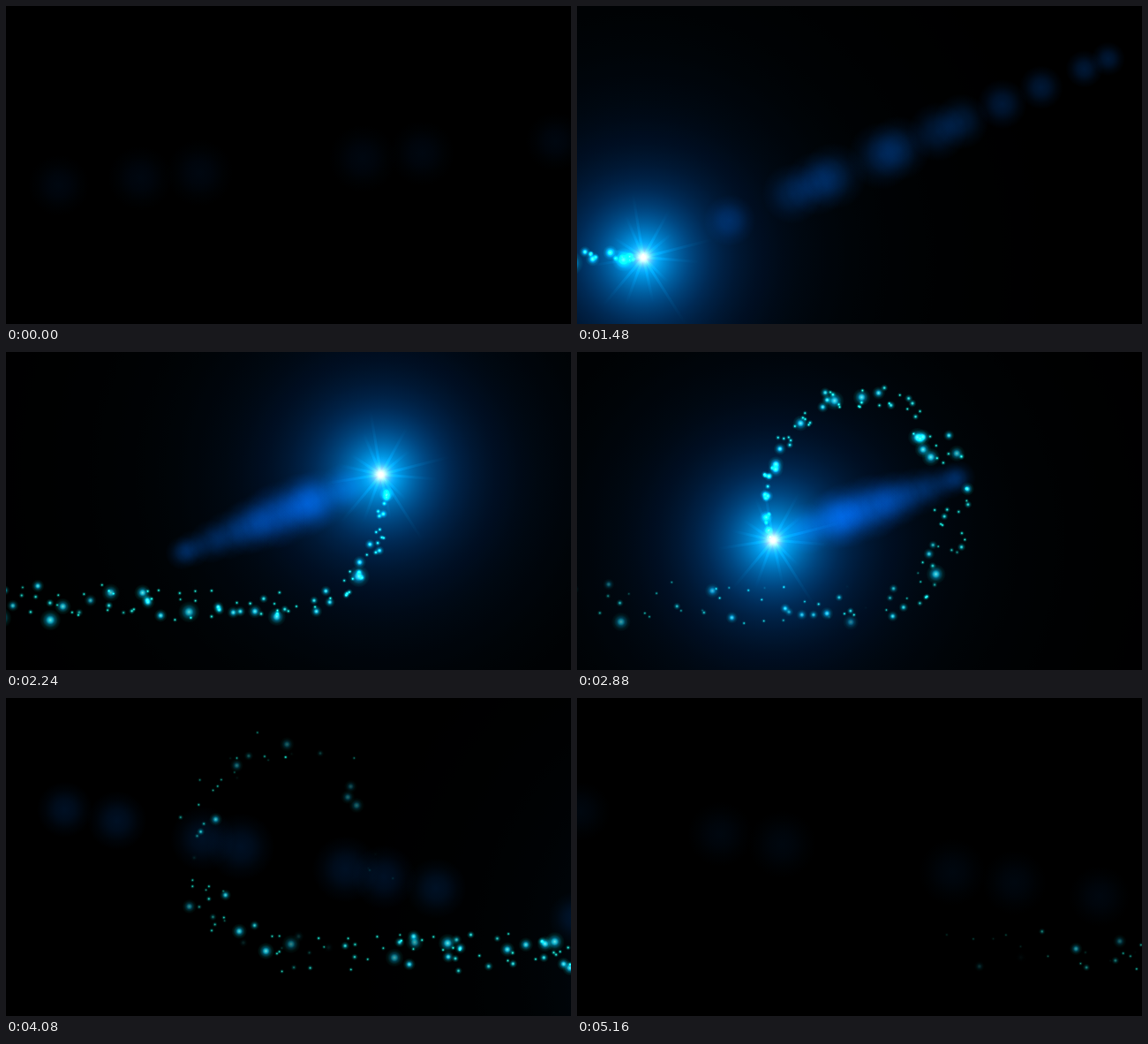
An HTML page with a canvas for the animation above (5.2 s loop, 640x360 px).

```html
<!DOCTYPE html>
<html>
<head>
<meta charset="utf-8">
<title>Comet</title>
<style>
html, body { margin: 0; width: 100%; height: 100%; overflow: hidden; background: #000; }
canvas { display: block; width: 640px; height: 360px; }
</style>
</head>
<body>
<canvas id="stage" width="640" height="360"></canvas>
<script>
const W = 640, H = 360, LOOP = 5200, STEP = 40, TAU = Math.PI * 2;
const ctx = document.getElementById('stage').getContext('2d');

// The comet flies in, circles once and flies out.
const TURN_START = 1885, TURN_END = 3110, SPEED = 0.62, SLOWING = 1950;
const turn = { x: 321, y: 168, rx: 107, ry: 118 };

// Lens ghosts, as places on the line from the stage centre (0) to the head (1).
const ghosts = [0.6, 0.31, 0.2, 0.12, -0.1, -0.18, -0.36, -0.47, -0.66, -0.84, -1.04, -1.15];

function headAt(t) {
  if (t > TURN_START && t < TURN_END) {
    const a = (t - TURN_START) / (TURN_END - TURN_START) * TAU;
    return [turn.x + turn.rx * Math.sin(a), turn.y + turn.ry * Math.cos(a)];
  }
  const side = t < TURN_END ? -1 : 1;
  const s = side < 0 ? TURN_START - t : t - TURN_END;
  const far = SPEED * s / Math.hypot(1, s / SLOWING);
  return [turn.x + side * far, turn.y + turn.ry + side * 9 * (s / 1000) ** 2];
}

let seed = 71;
function rnd() {
  seed = (seed * 16807) % 2147483647;
  return seed / 2147483647;
}

const sparks = Array.from({ length: 250 }, (_, i) => {
  const born = 1320 + i * 9.5 + rnd() * 40;
  const [x, y] = headAt(born);
  const dir = rnd() * TAU, far = 4 + 21 * Math.sqrt(rnd());
  return {
    born, x: x + (rnd() - 0.5) * 7, y: y + (rnd() - 0.5) * 7,
    dx: Math.cos(dir) * far, dy: Math.sin(dir) * far,
    size: 0.9 + 3.2 * rnd() ** 4, life: 900 + 1200 * rnd()
  };
});

const rays = Array.from({ length: 14 }, (_, i) => ({
  dir: (i + rnd() * 0.8) * TAU / 14, len: 40 + 60 * rnd() ** 2
}));

function rgb(r, g, b) {
  return `rgb(${[r, g, b].map(v => Math.round(Math.min(255, v)))})`;
}

function disc(x, y, r, stops) {
  if (x + r < 0 || x - r > W || y + r < 0 || y - r > H) return;
  const fill = ctx.createRadialGradient(x, y, 0, x, y, r);
  for (const [at, colour] of stops) fill.addColorStop(at, colour);
  ctx.fillStyle = fill;
  ctx.beginPath();
  ctx.arc(x, y, r, 0, TAU);
  ctx.fill();
}

// A steep bright core on a wide, faint blue haze.
const HALO = 520;
const haloStops = Array.from({ length: 61 }, (_, i) => {
  const at = (i / 60) ** 2, r = at * HALO, edge = 1 - at;
  const haze = Math.exp(-r / 180);
  return [at, rgb(
    270 * Math.exp(-((r / 9) ** 2)),
    (230 * Math.exp(-r / 40) + 24 * haze) * edge,
    (300 * Math.exp(-r / 56) + 36 * haze) * edge
  )];
});

function drawHead(x, y) {
  disc(x, y, HALO, haloStops);
  ctx.lineWidth = 3;
  for (const { dir, len } of rays) {
    const ex = x + Math.cos(dir) * len, ey = y + Math.sin(dir) * len;
    const fade = ctx.createLinearGradient(x, y, ex, ey);
    fade.addColorStop(0, rgb(0, 24, 30));
    fade.addColorStop(1, '#000');
    ctx.strokeStyle = fade;
    ctx.beginPath();
    ctx.moveTo(x, y);
    ctx.lineTo(ex, ey);
    ctx.stroke();
  }
}

function drawGhosts(hx, hy) {
  const ax = hx - W / 2, ay = hy - H / 2;
  const power = Math.min(1, Math.max(0.28, 1.35 - Math.abs(ax) / 800));
  const shade = k => rgb(0, 24 * k * power, 54 * k * power);
  for (const at of ghosts) {
    disc(W / 2 + ax * at, H / 2 + ay * at, 40 - 18 * Math.abs(at),
      [[0, shade(1)], [0.35, shade(0.75)], [0.7, shade(0.25)], [1, '#000']]);
  }
}

function drawSpark(s, t) {
  const age = t - s.born, u = age / s.life;
  if (u < 0 || u >= 1) return;
  const spread = 1 - Math.exp(-age / 380);
  const size = s.size * (1 - 0.25 * u), blue = Math.min(1, size / 2);
  ctx.globalAlpha = 1 - u ** 4;
  disc(s.x + s.dx * spread, s.y + s.dy * spread, size * 3.6, [
    [0, rgb(60 + 50 * blue, 235, 150 + 85 * blue)],
    [0.22, rgb(20, 180, 130 + 75 * blue)],
    [0.42, rgb(0, 80, 60 + 40 * blue)],
    [0.7, rgb(0, 26, 24)],
    [1, '#000']
  ]);
}

function draw(t) {
  const [hx, hy] = headAt(t);
  ctx.globalAlpha = 1;
  ctx.globalCompositeOperation = 'source-over';
  ctx.fillStyle = '#000';
  ctx.fillRect(0, 0, W, H);
  ctx.globalCompositeOperation = 'lighter';
  drawHead(hx, hy);
  drawGhosts(hx, hy);
  for (const s of sparks) drawSpark(s, t);
}

const start = performance.now();
let shown = -1;
function tick() {
  const now = Math.max(0, performance.now() - start) % LOOP;
  const t = Math.floor(now / STEP) * STEP;
  if (t !== shown) draw(shown = t);
  requestAnimationFrame(tick);
}
tick();
</script>
</body>
</html>
```
